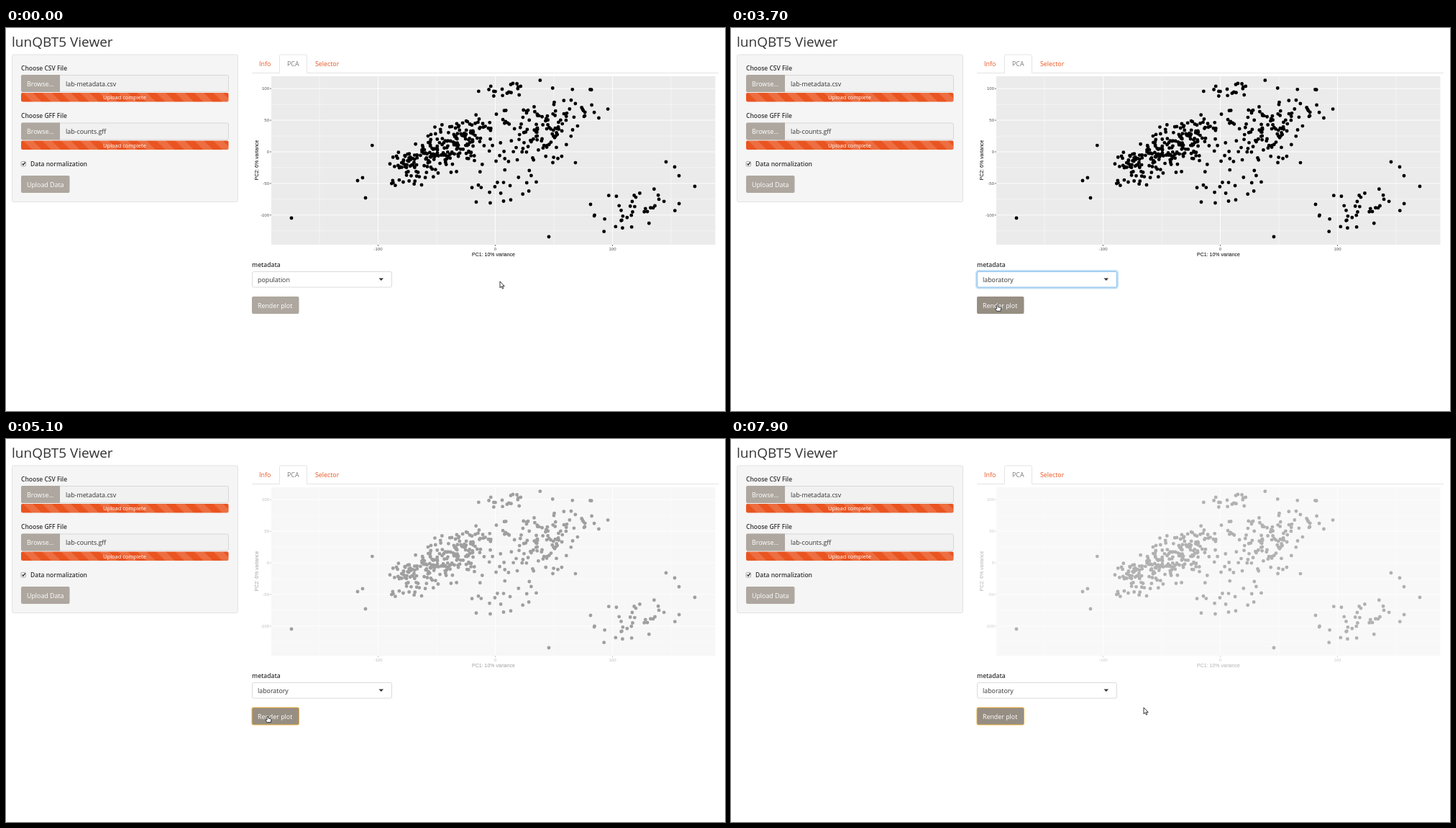
Recreate the animation shown at these times as an HTML page. Size 1000 by 532 pixels, loop 8 s.

```html
<!DOCTYPE html>
<html lang="en">
<head>
<meta charset="utf-8">
<title>Data viewer</title>
<style>
  html, body { margin: 0; width: 100%; height: 100%; overflow: hidden; background: #fff; }
  svg { display: block; width: 100%; height: 100%; }
  text { font: 8.85px "Open Sans", "Noto Sans", sans-serif; fill: #333; }
  .title { font-size: 19px; }
  .label { font-size: 8.5px; font-weight: 600; }
  .done { font-size: 7.5px; fill: #fff; text-anchor: middle; }
  .light { fill: #fff; }
  .link { fill: #e95420; }
  .btn { fill: #aea79f; }
  .well { fill: #f5f5f5; stroke: #e3e3e3; }
  .field { fill: #fff; stroke: #ccc; stroke-width: .7; }
  .readonly { fill: #f1f1f1; }
  #plot text { font: 7px "Liberation Sans", Arial, sans-serif; fill: #000; text-anchor: middle; }
  #plot .tick { font-size: 6px; fill: #4d4d4d; }
  #plot .left { text-anchor: end; }
</style>
</head>
<body>
<svg viewBox="0 0 1000 532" preserveAspectRatio="none">
  <defs>
    <pattern id="stripes" width="18.7" height="18.7" patternUnits="userSpaceOnUse" patternTransform="rotate(-45)">
      <rect width="18.7" height="18.7" fill="#ec6e41"/>
      <rect width="9.35" height="18.7" fill="#e95420"/>
    </pattern>
    <filter id="shadow" x="-10%" y="-30%" width="120%" height="180%">
      <feDropShadow dx="0" dy="3" stdDeviation="2" flood-opacity=".2"/>
    </filter>
    <g id="upload">
      <rect class="field readonly" x="21.5" y="65.5" width="288" height="23" rx="2"/>
      <path class="btn" d="M75 65H23a2 2 0 0 0-2 2V87a2 2 0 0 0 2 2H75z"/>
      <rect x="21" y="90" width="288.5" height="12.5" rx="2" fill="url(#stripes)"/>
      <text class="light" x="29" y="80.5">Browse...</text>
      <text class="done" x="165" y="99">Upload complete</text>
    </g>
  </defs>

  <text class="title" x="8" y="26">lunQBT5 Viewer</text>

  <rect class="well" x="8.5" y="37" width="314" height="204.5" rx="2"/>
  <use href="#upload"/>
  <use href="#upload" y="66.5"/>
  <text class="label" x="21" y="58.5">Choose CSV File</text>
  <text x="83" y="80.5">lab-metadata.csv</text>
  <text class="label" x="21" y="125">Choose GFF File</text>
  <text x="83" y="147">lab-counts.gff</text>
  <rect x="21" y="185.5" width="6.5" height="6.5" rx="1.2" fill="#f8f8f8" stroke="#999" stroke-width=".8"/>
  <path d="M22.5 188.5l1.5 1.7 2.7-3.7" fill="none" stroke="#333" stroke-width="1.3"/>
  <text class="label" x="34" y="192">Data normalization</text>
  <rect class="btn" x="21" y="205" width="67.5" height="24" rx="2"/>
  <text class="light" x="29" y="220.5">Upload Data</text>

  <path d="M342 62.5H380.5V39a2 2 0 0 1 2-2H416.5a2 2 0 0 1 2 2V62.5H991" fill="none" stroke="#ddd" stroke-width=".8"/>
  <text class="link" x="352" y="53">Info</text>
  <text x="391" y="53" style="fill:#777">PCA</text>
  <text class="link" x="430" y="53">Selector</text>

  <g id="plot">
    <rect x="369" y="67" width="617.5" height="234" fill="#ebebeb"/>
    <path id="grid" fill="none" stroke="#fff" stroke-width=".9"/>
    <path id="minor" fill="none" stroke="#fff" stroke-width=".4"/>
    <path id="ticks" fill="none" stroke="#333" stroke-width=".7"/>
    <g id="labels"></g>
    <path id="dots" fill="none" stroke="#000" stroke-width="4.9" stroke-linecap="round"/>
    <text x="678" y="317">PC1: 10% variance</text>
    <text transform="translate(351 183.5) rotate(-90)">PC2: 6% variance</text>
  </g>

  <text class="label" x="342" y="331.5">metadata</text>
  <rect id="glow" x="341.5" y="337.5" width="196" height="23.5" rx="3" fill="none" stroke="#66afe9" stroke-opacity=".4" stroke-width="3"/>
  <rect id="select" class="field" x="342.5" y="338.5" width="194" height="21.5" rx="2"/>
  <text id="choice" x="350" y="352.5"></text>
  <path id="caret" fill="#333"/>

  <rect id="button" x="342" y="373" width="65.5" height="24" rx="2"/>
  <text class="light" x="350" y="388.5">Render plot</text>

  <g id="menu">
    <rect class="field" x="342.5" y="361" width="194" height="42" rx="2" filter="url(#shadow)"/>
    <rect id="hover" x="343" width="193" height="17" fill="#f5f5f5"/>
    <text x="350" y="376.8">population</text>
    <text x="350" y="394">laboratory</text>
  </g>

  <g id="pointer" fill="#fff" stroke="#222" stroke-width=".9" stroke-linejoin="round">
    <path id="arrow" d="M0 0V8.8L2 7 3.5 10.2 4.9 9.5 3.5 6.5H6.2z"/>
    <path id="hand" d="M-1 .6Q0-.5 1 .6V3L4 3.5Q5.2 3.8 5 5L4.3 8.6H-1.2L-3.2 5.3Q-3 4.2-1 5.2z"/>
  </g>
</svg>
<script>
const LOOP = 8000, STEP = 100;
const OPEN = 2200, CHOOSE = 3200, PRESS = 4200, RELEASE = 4400, FADE = 4900;
const $ = id => document.getElementById(id);
const set = (id, name, value) => $(id).setAttribute(name, value);
const show = (id, on) => set(id, "visibility", on ? "visible" : "hidden");

// Plot axes
const xPos = v => 680.5 + v * 1.63, yPos = v => 172 - v * .878;
const range = (from, to, step) => Array.from({ length: (to - from) / step + 1 }, (_, i) => from + i * step);
const vLines = list => list.map(v => `M${xPos(v)} 67V301`).join("");
const hLines = list => list.map(v => `M369 ${yPos(v)}H986.5`).join("");
const xs = range(-100, 100, 100), ys = range(-100, 100, 50);
set("grid", "d", vLines(xs) + hLines(ys));
set("minor", "d", vLines(range(-150, 150, 100)) + hLines(range(-125, 75, 50)));
set("ticks", "d", xs.map(v => `M${xPos(v)} 301v2`).join("") + ys.map(v => `M367 ${yPos(v)}h2`).join(""));
$("labels").innerHTML =
  xs.map(v => `<text class="tick" x="${xPos(v)}" y="309">${v}</text>`).join("") +
  ys.map(v => `<text class="tick left" x="366" y="${yPos(v) + 2}">${v}</text>`).join("");

// Clouds of points: count, centre x, centre y, spread x, spread y, slope
const clouds = [
  [112, 574, 184, 27, 14, -.25],
  [108, 628, 160, 26, 16, -.3],
  [72, 746, 149, 21, 20, 0],
  [36, 786, 115, 24, 16, -.1],
  [44, 692, 152, 34, 25, 0],
  [18, 696, 85, 18, 6, -.25],
  [20, 690, 226, 28, 12, .1],
  [38, 874, 247, 30, 14, -.3]
];
const loners = [[397, 264], [500, 236], [489, 212], [755, 290], [958, 220], [918, 186], [930, 193]];

let seed = 11;
const random = () => (seed = seed * 16807 % 2147483647) / 2147483647;
const spread = () => (random() + random() + random() - 1.5) * 2;
function cloud([count, cx, cy, sx, sy, slope]) {
  return Array.from({ length: count }, () => {
    const dx = spread() * sx;
    return [cx + dx, cy + dx * slope + spread() * sy];
  });
}
set("dots", "d", [...loners, ...clouds.flatMap(cloud)].map(([x, y]) => `M${x} ${y}h.01`).join(""));

// Pointer path: time, x, y
const path = [
  [0, 687, 352], [100, 687, 352], [900, 530, 347], [1200, 519, 348],
  [OPEN, 519, 348], [2800, 404, 383], [CHOOSE, 404, 383], [3800, 364, 385],
  [5300, 364, 385], [5700, 469, 375], [6200, 574, 373], [LOOP, 574, 373]
];
const clamp = v => Math.min(1, Math.max(0, v));
const ease = u => u * u * (3 - 2 * u);

function pointerAt(t) {
  const i = path.findIndex(p => p[0] > t);
  const [t0, x0, y0] = path[i - 1], [t1, x1, y1] = path[i];
  const u = (t - t0) / (t1 - t0);
  return [x0 + (x1 - x0) * u, y0 + (y1 - y0) * u];
}

function draw(t) {
  const [x, y] = pointerAt(t);
  const open = t >= OPEN && t < CHOOSE;
  const focused = t >= OPEN && t < PRESS;
  const clicked = t >= PRESS;
  const overSelect = x > 342 && x < 537 && y > 338 && y < 360;
  const overButton = x > 342 && x < 407 && y > 373 && y < 397;
  const hand = open || overSelect || overButton;

  set("pointer", "transform", `translate(${x} ${y})`);
  show("hand", hand);
  show("arrow", !hand);

  show("menu", open);
  set("hover", "y", y > 378 ? 382.5 : 365.5);
  show("glow", focused);
  $("select").style.stroke = focused ? "#66afe9" : "";
  $("choice").textContent = t < CHOOSE ? "population" : "laboratory";
  set("caret", "d", open ? "M518.5 350.5h6.6l-3.3-3.5z" : "M518.5 347.5h6.6l-3.3 3.5z");

  const pressed = clicked && t < RELEASE;
  const lit = clicked || overButton && !open;
  set("button", "fill", pressed ? "#867c71" : lit ? "#978e83" : "#aea79f");
  set("button", "stroke", clicked ? "#efb13c" : "none");

  set("plot", "opacity", 1 - .7 * ease(clamp((t - FADE) / 250)));
}

function tick(now) {
  const t = now % LOOP;
  draw(t - t % STEP);
  requestAnimationFrame(tick);
}
draw(0);
requestAnimationFrame(tick);
</script>
</body>
</html>
```
